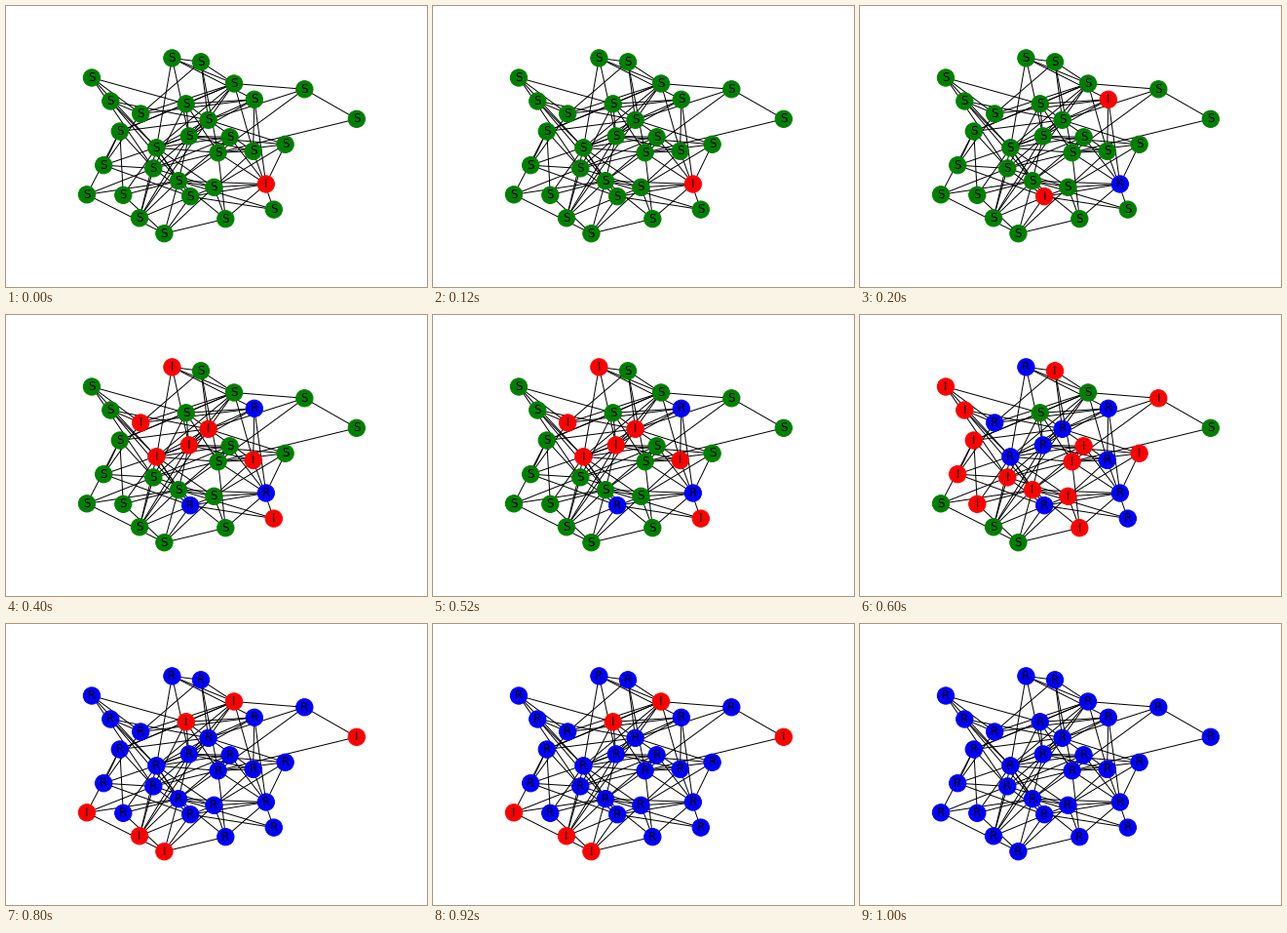
Write a matplotlib script that moves like this. It is 432 px wide and 288 px high and loops after 1.2 s.

```python
import matplotlib.pyplot as plt
from matplotlib.animation import FuncAnimation
from matplotlib.collections import LineCollection

WIDTH, HEIGHT, DPI = 432, 288, 72
STEPS, STEP_MS = 6, 200

# name: (x, y, step at which the node becomes infected)
NODES = {
    "A": (88, 73.5, 3), "B": (107.3, 97.5, 3), "C": (138.2, 110.5, 2),
    "D": (116.8, 128.5, 3), "E": (170.4, 53.4, 2), "F": (200, 57.3, 3),
    "G": (234, 79.5, 4), "H": (254.8, 95.8, 1), "I": (306.3, 85.3, 3),
    "J": (359.8, 115.8, 4), "K": (184.7, 100.3, 4), "L": (207.6, 116.8, 2),
    "M": (187.8, 133.4, 2), "N": (154.4, 145.3, 2), "O": (229.6, 134.3, 3),
    "P": (217.6, 150.3, 3), "Q": (253.6, 148.8, 2), "R": (286.6, 141.8, 3),
    "S": (266.8, 182.5, 0), "T": (274.8, 208.6, 2), "U": (225.3, 218.2, 3),
    "V": (213.4, 185.8, 3), "W": (189.2, 195.2, 1), "X": (177, 179.2, 3),
    "Y": (151.3, 166.4, 3), "Z": (100.2, 163.2, 3), "a": (83, 193.3, 4),
    "b": (120.3, 193.8, 3), "c": (137, 217.3, 4), "d": (162.4, 233.2, 4),
}

LINKS = {
    "A": "KCNY", "B": "CLNX", "C": "FGHZ", "D": "GLKYb",
    "E": "FGNMH", "F": "GLPC", "G": "IKLMNQ", "H": "KLMQS",
    "I": "JLP", "J": "P", "K": "LMPY", "L": "MNQRYc",
    "M": "NOQRXZc", "N": "OPWXVc", "O": "PSYX", "P": "QSXYUR",
    "Q": "VT", "R": "SV", "S": "UVXW", "T": "XW",
    "U": "XVd", "V": "XYcd", "W": "ZYd", "X": "abcd",
    "Y": "Zac", "Z": "D", "a": "Dd", "b": "Nd",
}

COLORS = {"S": "green", "I": "red", "R": "blue"}


def state_at(step, infected):
    """Susceptible until infected, infectious for one step, then recovered."""
    if step < infected:
        return "S"
    return "I" if step == infected else "R"


fig = plt.figure(figsize=(WIDTH / DPI, HEIGHT / DPI), dpi=DPI, facecolor="white")
ax = fig.add_axes([0, 0, 1, 1])
ax.set(xlim=(0, WIDTH), ylim=(HEIGHT, 0))
ax.axis("off")

points = {name: (x, y) for name, (x, y, _) in NODES.items()}
pairs = sorted({tuple(sorted((a, b))) for a, ends in LINKS.items() for b in ends})
segments = [(points[a], points[b]) for a, b in pairs]
ax.add_collection(LineCollection(segments, colors="black", linewidths=1, zorder=1))

dots = ax.scatter(*zip(*points.values()), s=300, c="green", zorder=2)
labels = [
    ax.text(x, y, "S", size=12, family="DejaVu Sans", ha="center", va="center", zorder=3)
    for x, y in points.values()
]


def update(step):
    states = [state_at(step, infected) for _, _, infected in NODES.values()]
    colors = [COLORS[state] for state in states]
    dots.set_facecolor(colors)
    dots.set_edgecolor(colors)
    for label, state in zip(labels, states):
        label.set_text(state)
    return [dots, *labels]


anim = FuncAnimation(fig, update, frames=STEPS, interval=STEP_MS, repeat=True, repeat_delay=0)
plt.show()
```
